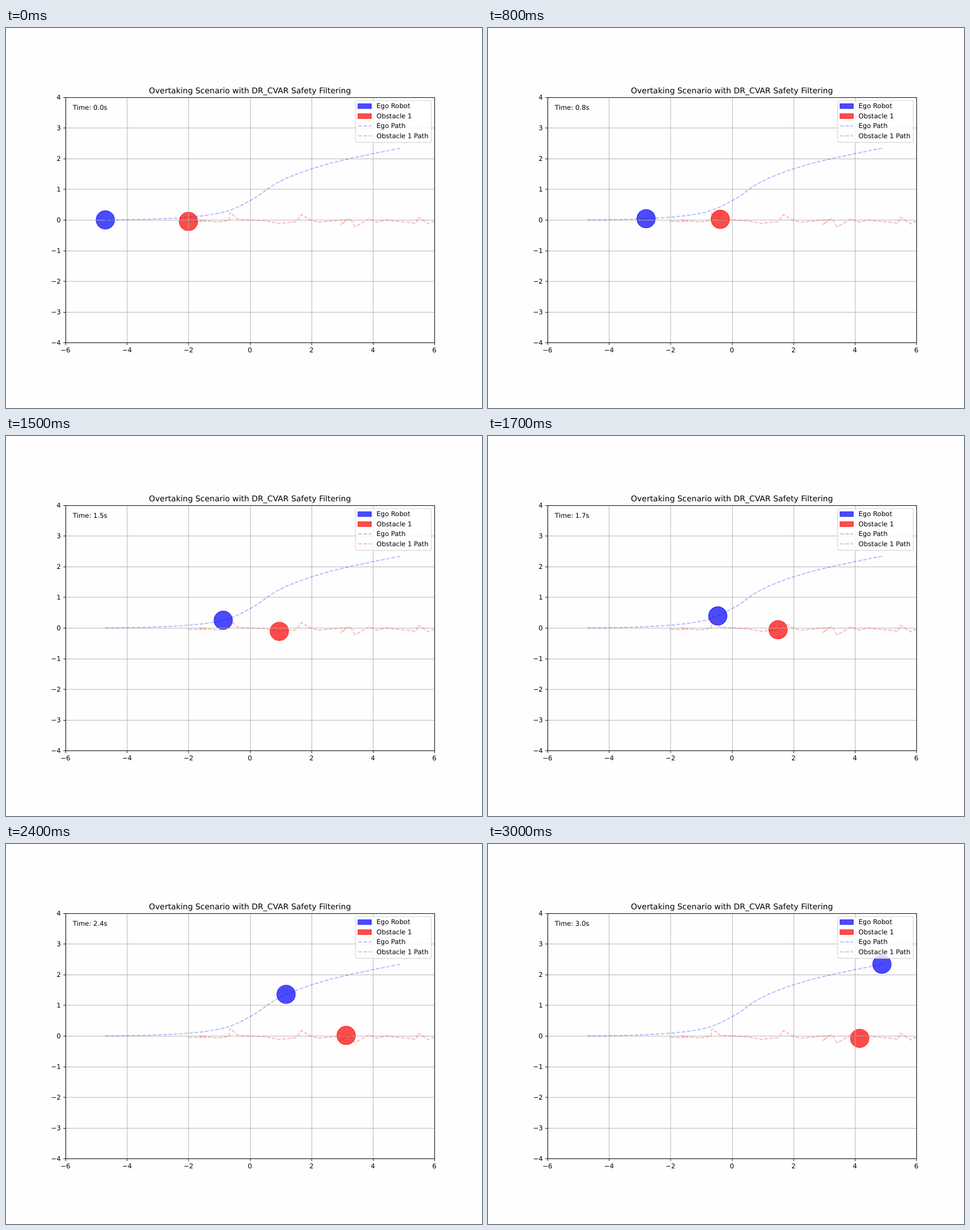
Write an HTML page that moves like this. It is 837 px wide and 669 px high and loops after 3100 ms.

```html
<!DOCTYPE html>
<html lang="en">
<head>
<meta charset="utf-8">
<title>Overtaking Scenario</title>
<style>
  html, body { margin: 0; width: 100%; height: 100%; overflow: hidden; background: #fefefe; }
  svg { display: block; width: 837px; height: 669px; }
  text { font: 13.89px "DejaVu Sans", sans-serif; text-rendering: geometricPrecision; }
  .title { font-size: 16.67px; }
  .mid { text-anchor: middle; }
  .end { text-anchor: end; }
  .blue { fill: #00f; stroke: #00f; }
  .red { fill: #f00; stroke: #f00; }
  .patch { fill-opacity: .7; stroke-opacity: .7; stroke-width: 1.39; }
  polyline.path { fill: none; }
  .path { stroke-opacity: .3; stroke-width: 2.08; stroke-dasharray: 7.71 3.33; stroke-linejoin: round; }
  .grid { stroke: #b0b0b0; stroke-width: 1.11; }
  .axis { fill: none; stroke: #000; stroke-width: 1.11; }
  .box { fill: #fff; fill-opacity: .8; stroke: #ccc; stroke-opacity: .8; stroke-width: 1.39; }
</style>
</head>
<body>
<svg id="plot" viewBox="0 0 1000 800" preserveAspectRatio="none"></svg>
<script>
const STEP = 100, STEPS = 31;
const UNIT = 775 / 12;
const px = x => 125 + (x + 6) * UNIT;
const py = y => 404 - y * UNIT;
const snap = v => Math.floor(v + .5) + .5;
const LEFT = snap(px(-6)), RIGHT = snap(px(6)), TOP = snap(py(4)), BOTTOM = snap(py(-4));

// Key poses: step, x, y in plot units
const egoKeys = [
  [0, -4.704, 0], [4, -4.019, .008], [8, -2.793, .04], [11, -1.905, .098], [15, -.869, .25],
  [20, .134, .7], [24, 1.176, 1.355], [27, 2.627, 1.85], [30, 4.879, 2.335]
];
const obstacleKeys = [
  [0, -2, -.05], [1, -1.44, -.05], [2, -1.63, 0], [4, -1.07, -.075], [6, -.68, -.01],
  [7, -.65, .24], [8, -.38, .02], [13, .5, -.03], [15, .955, -.113], [17, 1.5, -.06],
  [18, 1.684, .18], [20, 1.907, .025], [21, 2.22, -.08], [24, 3.13, .015], [25, 2.96, -.15],
  [26, 3.26, .05], [27, 3.42, -.225], [29, 3.87, .035], [30, 4.155, -.08], [31, 4.4, 0],
  [36, 5.4, -.11], [37, 5.47, .09], [39, 5.82, -.13], [40, 6.02, -.03]
];

// Cubic through the keys, slopes weighted by the neighbouring spans
function smooth(keys, axis, s) {
  const last = keys.length - 1;
  const span = i => keys[i + 1][0] - keys[i][0];
  const rate = i => (keys[i + 1][axis] - keys[i][axis]) / span(i);
  const slope = i =>
    i === 0 ? (3 * rate(0) - slope(1)) / 2 :
    i === last ? (3 * rate(last - 1) - slope(last - 1)) / 2 :
    (span(i - 1) * rate(i) + span(i) * rate(i - 1)) / (span(i - 1) + span(i));
  const i = Math.max(0, keys.findIndex(k => k[0] >= s) - 1);
  const h = span(i), u = (s - keys[i][0]) / h, v = 1 - u;
  const a = keys[i][axis], b = keys[i + 1][axis];
  return v * v * (1 + 2 * u) * a + u * u * (1 + 2 * v) * b + u * v * h * (v * slope(i) - u * slope(i + 1));
}
function linear(keys, axis, s) {
  const i = Math.max(0, keys.findIndex(k => k[0] >= s) - 1);
  const [a, b] = [keys[i], keys[i + 1]];
  return a[axis] + (b[axis] - a[axis]) * (s - a[0]) / (b[0] - a[0]);
}
const track = (keys, blend) => Array.from({ length: keys.at(-1)[0] + 1 },
  (_, s) => [px(blend(keys, 1, s)), py(blend(keys, 2, s))]);
const ego = track(egoKeys, smooth);
const obstacle = track(obstacleKeys, linear);

const plot = document.getElementById("plot");

function add(tag, attrs, text) {
  const el = document.createElementNS("http://www.w3.org/2000/svg", tag);
  for (const key in attrs) el.setAttribute(key, attrs[key]);
  if (text) el.textContent = text;
  return plot.appendChild(el);
}
const line = (cls, x1, y1, x2, y2) => add("line", { class: cls, x1, y1, x2, y2 });
const label = (cls, x, y, text) => add("text", { class: cls, x, y }, text);
const ball = color => add("circle", { class: `patch ${color}`, r: .3 * UNIT });
const trace = (color, points) =>
  add("polyline", { class: `${color} path`, points: points.join(" "), "clip-path": "url(#area)" });
const signed = n => String(n).replace("-", "\u2212");
const frame = { x: LEFT, y: TOP, width: RIGHT - LEFT, height: BOTTOM - TOP };

add("clipPath", { id: "area" }).append(add("rect", frame));

const egoBall = ball("blue");
const obstacleBall = ball("red");

for (let n = -6; n <= 6; n += 2) {
  const x = snap(px(n));
  line("grid", x, TOP, x, BOTTOM);
  line("axis", x, BOTTOM, x, BOTTOM + 5);
  label("mid", px(n), 683, signed(n));
}
for (let n = -4; n <= 4; n++) {
  const y = snap(py(n));
  line("grid", LEFT, y, RIGHT, y);
  line("axis", LEFT - 5, y, LEFT, y);
  label("end", 115.3, Math.round(py(n) + 5), signed(n));
}

trace("blue", ego);
trace("red", obstacle);

add("rect", { class: "axis", ...frame });
label("title mid", 512.5, 137, "Overtaking Scenario with DR_CVAR Safety Filtering");
const clock = label("", 140.5, 172, "");

add("rect", { class: "box", x: 734.5, y: 152.8, width: 158.8, height: 88, rx: 2.8 });
["Ego Robot", "Obstacle 1", "Ego Path", "Obstacle 1 Path"].forEach((name, i) => {
  const y = 169 + i * 21;
  const color = i % 2 ? "red" : "blue";
  if (i < 2) add("rect", { class: `patch ${color}`, x: 739.5, y: y - 9.5, width: 28, height: 10 });
  else line(`${color} path`, 739.7, y - 5, 767.5, y - 5);
  label("", 778.4, y, name);
});

function place(el, [x, y]) {
  el.setAttribute("cx", x);
  el.setAttribute("cy", y);
}

const start = performance.now();
let shown = -1;
function draw(now) {
  const step = Math.floor(Math.max(0, now - start) / STEP) % STEPS;
  if (step !== shown) {
    shown = step;
    place(egoBall, ego[step]);
    place(obstacleBall, obstacle[step]);
    clock.textContent = `Time: ${(step / 10).toFixed(1)}s`;
  }
  requestAnimationFrame(draw);
}
draw(start);
</script>
</body>
</html>
```
